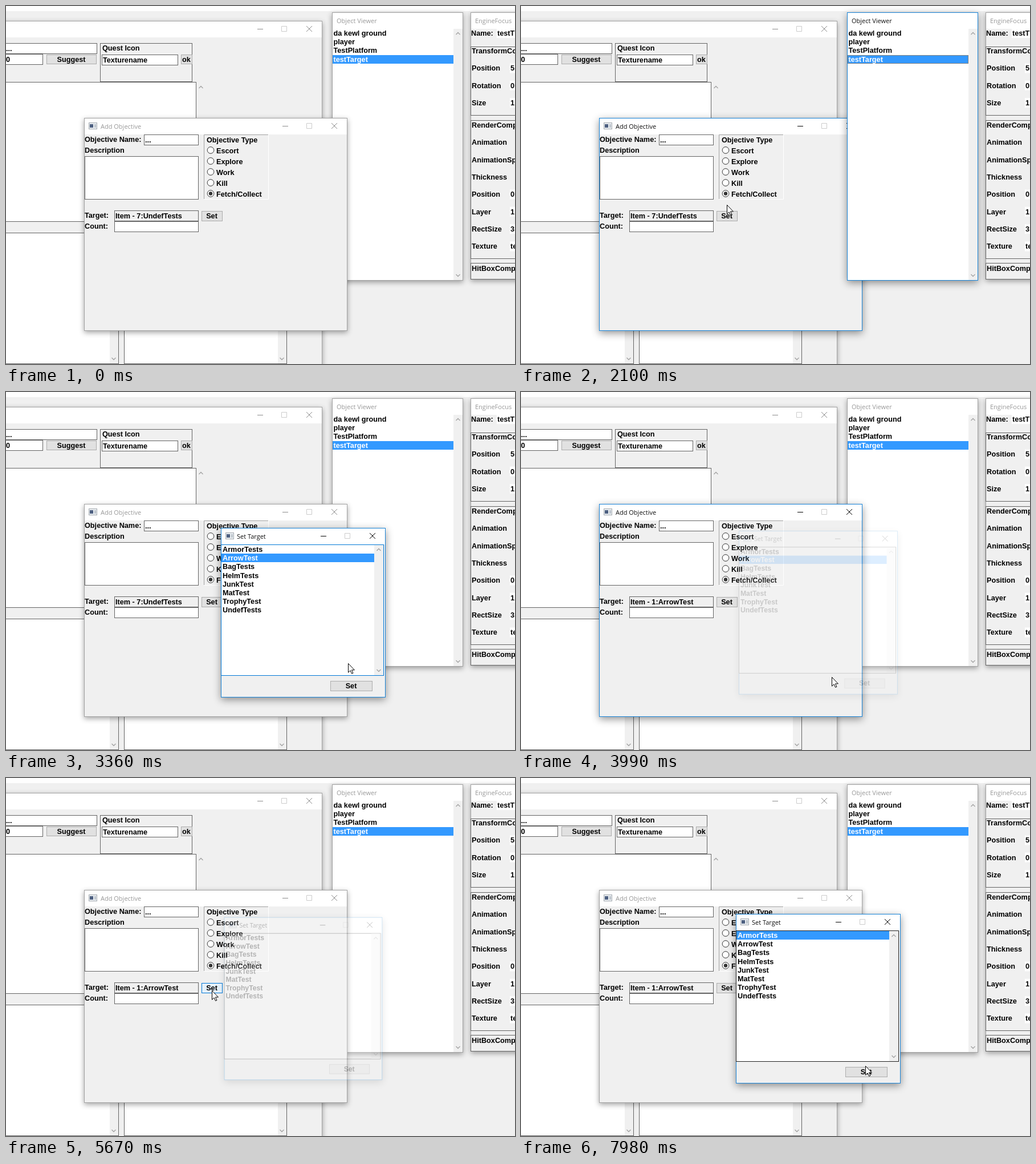
Recreate the animation shown at these times as an HTML page. Size 893x627 px, loop 8000 ms.

```html
<!DOCTYPE html>
<html lang="en">
<head>
<meta charset="utf-8">
<title>Add Objective</title>
<style>
  html, body { margin: 0; width: 100%; height: 100%; overflow: hidden; background: #f0f0f0; }
  svg { display: block; width: 893px; height: 627px; }
  text { font: bold 12.7px "Liberation Sans", Arial, sans-serif; white-space: pre; }
  .title { font: 11px "Open Sans", "Noto Sans", sans-serif; fill: #999; }
  .glyph { fill: none; stroke: #8c8c8c; }
  .off { fill: none; stroke: #ccc; }
  .chevron { fill: none; stroke: #a3a3a3; stroke-width: 1.3; }
  .frame { stroke: #a2a2a2; filter: drop-shadow(0 3px 5px rgba(0, 0, 0, .36)); }
  .active > .frame { stroke: #1883d7; filter: drop-shadow(0 4px 7px rgba(0, 0, 0, .42)); }
  .active > .title { fill: #111; }
  .active > .glyph { stroke: #000; }
</style>
</head>
<body>
<svg id="stage" viewBox="0 0 893 627"></svg>
<script>
const stage = document.getElementById('stage');
const GREY = '#f0f0f0', LINE = '#646464', BLUE = '#3399ff';

function add(parent, tag, attrs = {}, content) {
  const node = document.createElementNS('http://www.w3.org/2000/svg', tag);
  for (const key in attrs) node.setAttribute(key, attrs[key]);
  if (content !== undefined) node.textContent = content;
  parent.append(node);
  return node;
}
const group = parent => add(parent, 'g');
const fill = (g, x, y, x2, y2, color) =>
  add(g, 'rect', { x, y, width: x2 - x, height: y2 - y, fill: color });
// One pixel outline whose edges lie on the given pixel columns and rows.
const box = (g, x, y, x2, y2, color = '#fff', stroke = LINE) =>
  add(g, 'rect', { x: x + .5, y: y + .5, width: x2 - x, height: y2 - y, fill: color, stroke });
const label = (g, x, y, str, attrs = {}) => add(g, 'text', { x, y, ...attrs }, str);
const path = (g, d, attrs) => add(g, 'path', { d, ...attrs });
const chevron = (g, x, y, dir) =>
  path(g, `M${x - 3.5} ${y - 2 * dir}l3.5 ${3.5 * dir}l3.5 ${-3.5 * dir}`, { class: 'chevron' });

function button(g, x, y, x2, y2, str) {
  const face = box(g, x, y, x2, y2, '#e1e1e1', '#adadad');
  label(g, (x + x2) / 2, y + 13, str, { 'text-anchor': 'middle' });
  return face;
}

function makeWindow(parent, x, y, x2, y2, { title = '', titleX = 8, icon, close } = {}) {
  const g = group(parent);
  box(g, x, y, x2, y2, GREY, '').setAttribute('class', 'frame');
  fill(g, x + 1, y + 1, x2, y + 29, '#fff');
  label(g, x + titleX, y + 19, title, { class: 'title' });
  if (icon) {
    const ix = x + 8, iy = y + 8;
    box(g, ix, iy, ix + 14, iy + 11, '#e9edf1', '#a5abb1');
    fill(g, ix + 2, iy + 3, ix + 8, iy + 9, '#4c5f80');
    fill(g, ix + 10, iy + 3, ix + 13, iy + 9, '#bcc4cc');
  }
  if (close) {
    const cy = y + 14;
    path(g, `M${close - 91} ${cy + .5}h10M${close - 5} ${cy - 5}l10 10m0 -10l-10 10`, { class: 'glyph' });
    path(g, `M${close - 48.5} ${cy - 4.5}h9v9h-9z`, { class: 'off' });
  }
  return g;
}

// Backdrop and quest editor
fill(stage, 0, 0, 893, 627, GREY);
fill(stage, 0, 0, 893, 9, '#fefefe');
const quest = makeWindow(stage, -20, 26, 554, 660, { close: 532 });
box(quest, -2, 65, 159, 83);
label(quest, 0, 79, '...');
box(quest, -2, 84, 64, 102);
label(quest, 0, 98, '0');
button(quest, 71, 85, 158, 101, 'Suggest');
box(quest, 165, 65, 326, 132, GREY);
label(quest, 169, 78, 'Quest Icon');
box(quest, 168, 85, 301, 103);
label(quest, 170, 99, 'Texturename');
button(quest, 307, 85, 326, 101, 'ok');
box(quest, -2, 133, 333, 377);
chevron(quest, 342, 142, -1);
box(quest, -2, 377, 333, 397, GREY);
for (const [x, x2] of [[-2, 197], [207, 492]]) {
  box(quest, x, 397, x2, 626);
  fill(quest, x2 - 15, 398, x2, 626, GREY);
  chevron(quest, x2 - 8, 618, 1);
}

// Component inspector
const inspector = makeWindow(stage, 815, 11, 930, 478, { title: 'EngineFocus' });
fill(inspector, 861, 40, 893, 56, '#fff');
label(inspector, 816, 52, 'Name:');
label(inspector, 862, 52, 'testT');
for (const [y, y2] of [[71, 191], [200, 442], [450, 478]]) box(inspector, 815, y, 920, y2, GREY);
function fields(top, rows) {
  rows.forEach(([name, value], i) => {
    const y = top + i * 30.35;
    label(inspector, 817, y, name);
    if (value) {
      fill(inspector, 884, y - 13, 893, y + 4, '#fff');
      label(inspector, 885, y, value);
    }
  });
}
fields(83, [['TransformComp'], ['Position', '5'], ['Rotation', '0'], ['Size', '1']]);
fields(213, [['RenderComponent'], ['Animation'], ['AnimationSpeed'], ['Thickness'],
  ['Position', '0'], ['Layer', '1'], ['RectSize', '3'], ['Texture', 'te']]);
fields(464, [['HitBoxComponent']]);

// Object viewer
const layers = group(stage);
const viewer = makeWindow(layers, 572, 11, 801, 480, { title: 'Object Viewer' });
fill(viewer, 573, 40, 785, 480, '#fff');
fill(viewer, 785, 40, 801, 480, GREY);
chevron(viewer, 793, 48, -1);
chevron(viewer, 793, 472, 1);
fill(viewer, 573, 86, 785, 101, BLUE);
const focusRect = box(viewer, 573, 86, 784, 100, 'none', '#cc6600');
focusRect.setAttribute('stroke-dasharray', '1 1');
['da kewl ground', 'player', 'TestPlatform', 'testTarget'].forEach((name, i) =>
  label(viewer, 574.5, 52 + i * 15.2, name, { fill: i === 3 ? '#fff' : '#000' }));

// Objective dialog
const objective = makeWindow(layers, 137, 196, 598, 568,
  { title: 'Add Objective', titleX: 29, icon: true, close: 576 });
label(objective, 138, 238, 'Objective Name:');
box(objective, 242, 225, 337, 243);
label(objective, 244, 239, '...');
label(objective, 138, 257, 'Description');
box(objective, 138, 263, 337, 338);
path(objective, 'M347.5 338V225.5H460', { fill: 'none', stroke: '#a0a0a0' });
path(objective, 'M347 338.5H460.5V225', { fill: 'none', stroke: '#fff' });
label(objective, 352, 238.5, 'Objective Type');
let radio;
['Escort', 'Explore', 'Work', 'Kill', 'Fetch/Collect'].forEach((name, i) => {
  const y = 252.5 + i * 19;
  radio = add(objective, 'circle', { cx: 359, cy: y, r: 5.8, fill: '#fff', stroke: '#333' });
  label(objective, 369, y + 5, name);
});
add(objective, 'circle', { cx: 359, cy: 328.5, r: 3.2, fill: '#333' });
label(objective, 138, 370.5, 'Target:');
box(objective, 190, 358, 337, 376, GREY);
const targetText = label(objective, 192, 372, '');
const openButton = button(objective, 343, 359, 379, 376, 'Set');
label(objective, 138, 389.5, 'Count:');
box(objective, 190, 377, 337, 395);

// Target picker
const picker = makeWindow(stage, 377, 238, 665, 534,
  { title: 'Set Target', titleX: 28, icon: true, close: 643 });
picker.setAttribute('class', 'active');
const list = box(picker, 377, 267, 662, 496);
fill(picker, 646, 268, 662, 496, GREY);
chevron(picker, 654, 276, -1);
chevron(picker, 654, 488, 1);
const selection = fill(picker, 378, 268, 646, 283, BLUE);
const items = ['ArmorTests', 'ArrowTest', 'BagTests', 'HelmTests', 'JunkTest', 'MatTest', 'TrophyTest', 'UndefTests']
  .map((name, i) => label(picker, 380, 280 + i * 15.2, name));
const confirmButton = button(picker, 569, 506, 642, 523, 'Set');

// Pointers
const arrow = path(stage, 'M.5 .5V16.2L4.1 12.8L6.6 18.3L8.9 17.3L6.5 11.9H11.4Z', { fill: '#fff', stroke: '#000' });
const beam = path(stage, 'M-3 -8h2.5h1h2.5M0 -8V8M-3 8h6', { fill: 'none', stroke: '#000' });

const route = [
  [140, 786, 610], [490, 610, 460], [840, 440, 334], [980, 430, 331], [1400, 619, 94], [1540, 619, 94],
  [2100, 361, 348], [2240, 361, 366], [2590, 361, 366], [2870, 440, 291], [3150, 440, 291],
  [3360, 600, 475], [3500, 606, 512], [3800, 606, 512], [3990, 545, 499], [4410, 268, 374],
  [4480, 268, 374], [4760, 352, 376], [4830, 361, 377], [5110, 361, 372], [5880, 361, 372],
  [6370, 441, 286], [6440, 440, 287], [6510, 440, 287], [6790, 440, 289], [7000, 440, 289],
  [7280, 432, 274], [7420, 432, 274], [7980, 604, 504], [8000, 604, 504]
];
const clamp = v => Math.min(1, Math.max(0, v));
const within = (t, a, b) => t >= a && t < b;
const show = (node, on) => node.setAttribute('visibility', on ? 'visible' : 'hidden');

function pointerAt(t) {
  const i = Math.max(1, route.findIndex(p => p[0] >= t));
  const [t0, x0, y0] = route[i - 1], [t1, x1, y1] = route[i];
  const k = clamp((t - t0) / (t1 - t0)), e = k * k * (3 - 2 * k);
  return [Math.round(x0 + (x1 - x0) * e), Math.round(y0 + (y1 - y0) * e)];
}

function glow(face, level) {
  const mix = (a, b) => `rgb(${a.map((v, i) => Math.round(v + (b[i] - v) * level))})`;
  face.setAttribute('fill', mix([225, 225, 225], [229, 241, 251]));
  face.setAttribute('stroke', mix([173, 173, 173], [0, 120, 215]));
}

function showPicker(t) {
  let scale = 1, opacity = 0;
  for (const [opens, closes] of [[2380, 3860], [5600, 9000]]) {
    if (!within(t, opens, closes + 155)) continue;
    const enter = clamp((t - opens) / 280), leave = Math.max(0, t - closes);
    opacity = enter * (1 - leave / 155);
    scale = 1 - .07 * (1 - enter) ** 2 - .035 * leave / 130;
  }
  picker.setAttribute('opacity', opacity);
  picker.setAttribute('transform', `translate(520.5 385.5) scale(${scale}) translate(-520.5 -385.5)`);
  show(picker, opacity > 0);
}

function render(t) {
  const [x, y] = pointerAt(t);
  const viewerActive = within(t, 1400, 2310);
  const objectiveActive = within(t, 980, 2450) || within(t, 3850, 5670);
  viewer.setAttribute('class', viewerActive ? 'active' : '');
  objective.setAttribute('class', objectiveActive ? 'active' : '');
  const top = viewerActive ? viewer : objective;
  if (layers.lastChild !== top) layers.append(top);
  show(focusRect, viewerActive);

  radio.setAttribute('stroke', within(t, 840, 1120) ? '#0078d7' : '#333');
  targetText.textContent = within(t, 3780, 8000) ? 'Item - 1:ArrowTest' : 'Item - 7:UndefTests';
  const opening = within(t, 2170, 2730) ? 2170 : within(t, 4760, 5950) ? 4760 : t;
  glow(openButton, clamp((t - opening) / 200));
  glow(confirmButton, within(t, 3430, 3860) ? clamp((t - 3430) / 140) : 0);

  showPicker(t);
  const row = t >= 7210 ? 0 : t >= 6580 || within(t, 3080, 4200) ? 1 : -1;
  selection.setAttribute('y', row === 1 ? 283 : 268);
  selection.setAttribute('fill', row < 0 ? 'none' : BLUE);
  items.forEach((item, i) => item.setAttribute('fill', i === row ? '#fff' : '#000'));
  list.setAttribute('stroke', x > 377 && y < 497 ? '#0078d7' : '#222');

  const editing = within(t, 4200, 4800) && x > 190 && x < 337 && y > 358 && y < 396;
  show(arrow, t >= 140 && !editing);
  show(beam, editing);
  arrow.setAttribute('transform', `translate(${x} ${y})`);
  beam.setAttribute('transform', `translate(${x + .5} ${y + .5})`);
}

function tick() {
  const t = performance.now() % 8000;
  render(Math.floor(t / 70 + .01) * 70);
  requestAnimationFrame(tick);
}
tick();
</script>
</body>
</html>
```
